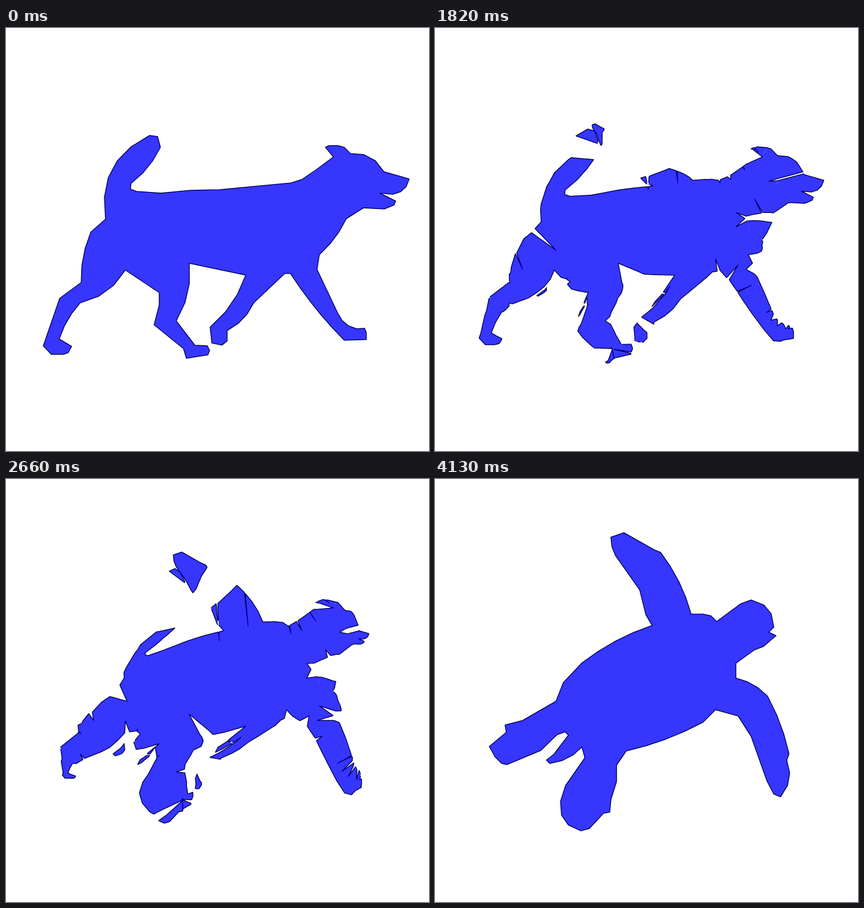
An HTML page with a canvas for the animation above (4.83 s loop, 748 px wide and 748 px high).

```html
<!DOCTYPE html>
<html lang="en">
<head>
<meta charset="utf-8">
<title>Dog to turtle morph</title>
<style>
  html, body { margin: 0; width: 100%; height: 100%; overflow: hidden; background: #fff; }
  canvas { display: block; }
</style>
</head>
<body>
<canvas id="stage" width="748" height="748"></canvas>
<script>
const SIZE = 748, LOOP = 4830, HOLD = 700, STEP = 70, STEPS = 50;
const FILL = '#00f', FILL_ALPHA = 200 / 255, LINE_WIDTH = 1.5;
const FACET = 33, OVERLAP = 0.8, SAMPLE = 0.7, FAN_STEP = 0.008;

// Key points [x, y, bulge], clockwise; bulge bows the edge to the next point outwards.
const dogParts = {
  tail: [[66, 562], [95, 478], [133, 450, 5], [150, 361], [176, 338, 31], [254, 190],
    [268, 192], [273, 211, 5], [221, 275], [220, 285], [231, 289]],
  back: [[274, 292], [327, 287], [377, 286], [430, 281], [504, 274], [523, 268], [548, 251]],
  head: [[579, 228], [565, 211], [571, 208], [587, 208], [598, 211], [609, 222, 11],
    [668, 254], [713, 267, 7], [684, 294], [661, 292], [689, 306], [686, 313], [669, 320],
    [632, 318], [602, 337, 4]],
  frontLegs: [[554, 401], [550, 427], [586, 503, -6], [620, 532], [634, 531], [637, 538],
    [637, 551], [598, 552, 4], [503, 434], [493, 434], [438, 486, 6], [391, 535, 16],
    [364, 557], [361, 529, -8], [424, 437]],
  hindLegs: [[324, 416, 9], [301, 518], [334, 561], [356, 562], [360, 570], [357, 578],
    [319, 584], [314, 567], [262, 525], [271, 490], [271, 468], [211, 428, 11],
    [131, 486, -4], [94, 550], [116, 563], [110, 574], [102, 577], [80, 577]]
};
const turtleParts = {
  shell: [[96, 473], [126, 448], [124, 435], [155, 427], [214, 393], [227, 360], [260, 325, 6]],
  upperFlipper: [[384, 259], [373, 240], [362, 196], [319, 135], [313, 120], [311, 103],
    [334, 95], [387, 125], [399, 130, 6], [453, 239], [474, 239], [488, 242]],
  head: [[498, 252], [540, 221], [559, 214, 13], [599, 262], [590, 271], [603, 277],
    [581, 296], [565, 302], [532, 326]],
  lowerFlipper: [[532, 352, 5], [588, 384, 4], [626, 486], [622, 497, 10], [611, 562],
    [599, 557], [587, 534], [559, 455], [536, 419], [496, 408], [474, 430, 5]],
  hind: [[338, 481], [321, 506], [321, 535], [311, 567], [309, 589], [298, 591], [273, 618],
    [258, 622, 14], [222, 570], [231, 542], [265, 493], [260, 474, 6], [203, 503], [197, 497],
    [210, 487], [236, 453], [230, 447], [216, 452], [187, 480], [127, 505], [118, 503],
    [106, 491]]
};

// Splits each bowed edge into the straight facets of a parabola.
function facet(keys) {
  return keys.flatMap(([x, y, bulge], i) => {
    if (!bulge) return [[x, y]];
    const [ex, ey] = keys[(i + 1) % keys.length];
    const dx = ex - x, dy = ey - y, len = Math.hypot(dx, dy);
    const count = Math.max(3, Math.round(len / FACET));
    return Array.from({ length: count }, (_, j) => {
      const s = j / count, bow = 4 * s * (1 - s) * bulge / len;
      return [x + s * dx + bow * dy, y + s * dy - bow * dx];
    });
  });
}

function makeShape(parts) {
  const points = facet(Object.values(parts).flat());
  const path = new Path2D();
  const edges = points.map(([x, y], i) => {
    const [ex, ey] = points[(i + 1) % points.length];
    path.lineTo(x, y);
    return { x, y, dx: ex - x, dy: ey - y, len: Math.hypot(ex - x, ey - y) };
  });
  path.closePath();
  return { edges, path };
}

function inside(shape, x, y) {
  let odd = false;
  for (const e of shape.edges) {
    if ((e.y > y) !== (e.y + e.dy > y) && x < e.x + e.dx * (y - e.y) / e.dy) odd = !odd;
  }
  return odd;
}

function nearest(shape, x, y) {
  let best = Infinity, bx = 0, by = 0;
  for (const e of shape.edges) {
    let s = ((x - e.x) * e.dx + (y - e.y) * e.dy) / (e.len * e.len);
    s = s < 0 ? 0 : s > 1 ? 1 : s;
    const qx = e.x + s * e.dx, qy = e.y + s * e.dy;
    const d = (qx - x) ** 2 + (qy - y) ** 2;
    if (d < best) { best = d; bx = qx; by = qy; }
  }
  return { x: bx, y: by, dist: Math.sqrt(best) };
}

// Parts of the other shape along a ray whose nearest point on `feet` is the ray's start.
function findSpans(feet, other, ray) {
  const hits = [];
  for (const e of other.edges) {
    const det = ray.nx * e.dy - ray.ny * e.dx;
    if (!det) continue;
    const rx = e.x - ray.x, ry = e.y - ray.y;
    const s = (rx * ray.ny - ry * ray.nx) / det;
    const t = (rx * e.dy - ry * e.dx) / det;
    if (s >= 0 && s < 1 && t > 0) hits.push(t);
  }
  hits.sort((a, b) => a - b);
  if (hits.length % 2) hits.unshift(0);
  if (!hits.length) return [];

  const reaches = t =>
    nearest(feet, ray.x + t * ray.nx, ray.y + t * ray.ny).dist >= t - 1e-6;
  let limit = hits[hits.length - 1];
  if (!reaches(limit)) {
    let low = 0, high = limit;
    for (let i = 0; i < 24; i++) {
      const mid = (low + high) / 2;
      if (reaches(mid)) low = mid; else high = mid;
    }
    limit = low;
  }
  const spans = [];
  for (let i = 0; i < hits.length && hits[i] <= limit; i += 2) {
    spans.push([hits[i], Math.min(hits[i + 1], limit)]);
  }
  return spans;
}

// Outward rays along every edge, and fanned around every convex corner.
function makeRegion(feet, other) {
  const rays = [];
  const add = (x, y, nx, ny) => {
    const ray = { x, y, nx, ny };
    ray.spans = findSpans(feet, other, ray);
    rays.push(ray);
  };
  feet.edges.forEach((e, i) => {
    const next = feet.edges[(i + 1) % feet.edges.length];
    const nx = e.dy / e.len, ny = -e.dx / e.len;
    const count = Math.ceil(e.len / SAMPLE);
    for (let j = 0; j <= count; j++) {
      add(e.x + e.dx * j / count, e.y + e.dy * j / count, nx, ny);
    }
    const turn = Math.atan2(e.dx * next.dy - e.dy * next.dx, e.dx * next.dx + e.dy * next.dy);
    const start = Math.atan2(ny, nx), fan = Math.ceil(turn / FAN_STEP);
    for (let j = 1; j < fan; j++) {
      const angle = start + turn * j / fan;
      add(next.x, next.y, Math.cos(angle), Math.sin(angle));
    }
  });

  const strips = [];
  rays.forEach((a, i) => {
    const b = rays[(i + 1) % rays.length];
    const same = a.spans.length === b.spans.length;
    a.spans.forEach((p, m) => b.spans.forEach((q, n) => {
      if (same ? m === n : p[0] <= q[1] && q[0] <= p[1]) {
        const joined = end => same || Math.abs(p[end] - q[end]) < 4;
        strips.push({ a, b, p, q, near: (p[0] > 0 || q[0] > 0) && joined(0), far: joined(1) });
      }
    }));
  });
  return { feet, other, strips };
}

// Whether the opposite region, scaled by `scale`, covers a point of this one.
function covered({ feet, other }, scale, x, y) {
  if (inside(other, x, y)) return false;
  const c = nearest(other, x, y);
  const ax = c.x + (x - c.x) / scale, ay = c.y + (y - c.y) / scale;
  return inside(feet, ax, ay) && nearest(other, ax, ay).dist >= c.dist / scale - 1e-4;
}

const canvas = document.getElementById('stage');
const ctx = canvas.getContext('2d');
ctx.lineWidth = LINE_WIDTH;
ctx.lineJoin = ctx.lineCap = 'round';
const layer = canvas.cloneNode();
const fillCtx = layer.getContext('2d');
fillCtx.fillStyle = FILL;

const dog = makeShape(dogParts);
const turtle = makeShape(turtleParts);
const shrinking = makeRegion(turtle, dog);
const growing = makeRegion(dog, turtle);

const at = (ray, t) => [ray.x + ray.nx * t, ray.y + ray.ny * t];

function fillRegion({ strips }, scale) {
  const path = new Path2D();
  const inner = t => t > 0 ? t * scale : -OVERLAP;
  for (const { a, b, p, q } of strips) {
    path.moveTo(...at(a, inner(p[0])));
    path.lineTo(...at(a, p[1] * scale));
    path.lineTo(...at(b, q[1] * scale));
    path.lineTo(...at(b, inner(q[0])));
    path.closePath();
  }
  fillCtx.fill(path);
}

function strokeRegion(region, scale) {
  const path = new Path2D();
  const line = (s, end) => {
    const from = at(s.a, s.p[end] * scale), to = at(s.b, s.q[end] * scale);
    const mx = (from[0] + to[0]) / 2, my = (from[1] + to[1]) / 2;
    if (covered(region, 1 - scale, mx, my)) return;
    path.moveTo(...from);
    path.lineTo(...to);
  };
  for (const s of region.strips) {
    if (s.far) line(s, 1);
    if (s.near) line(s, 0);
  }
  ctx.stroke(path);
}

function drawWhole({ path }) {
  fillCtx.fill(path);
  ctx.stroke(path);
}

function drawMix(mix) {
  fillCtx.save();
  fillCtx.clip(dog.path);
  fillCtx.fill(turtle.path);
  fillCtx.restore();
  for (const [region, scale] of [[shrinking, 1 - mix], [growing, mix]]) {
    fillRegion(region, scale);
    strokeRegion(region, scale);
  }
}

// The translucent fill lies over the black outline.
function draw(step) {
  ctx.fillStyle = '#fff';
  ctx.fillRect(0, 0, SIZE, SIZE);
  fillCtx.clearRect(0, 0, SIZE, SIZE);
  const u = step / STEPS;
  if (u === 0) drawWhole(dog);
  else if (u === 1) drawWhole(turtle);
  else drawMix(u < 0.5 ? 2 * u * u : 1 - 2 * (1 - u) ** 2);
  ctx.globalAlpha = FILL_ALPHA;
  ctx.drawImage(layer, 0, 0);
  ctx.globalAlpha = 1;
}

let shown = -1;
function tick() {
  const t = performance.now() % LOOP;
  const step = t < HOLD ? 0 : Math.min(STEPS, 1 + Math.floor((t - HOLD) / STEP));
  if (step !== shown) draw(shown = step);
  requestAnimationFrame(tick);
}
tick();
</script>
</body>
</html>
```
